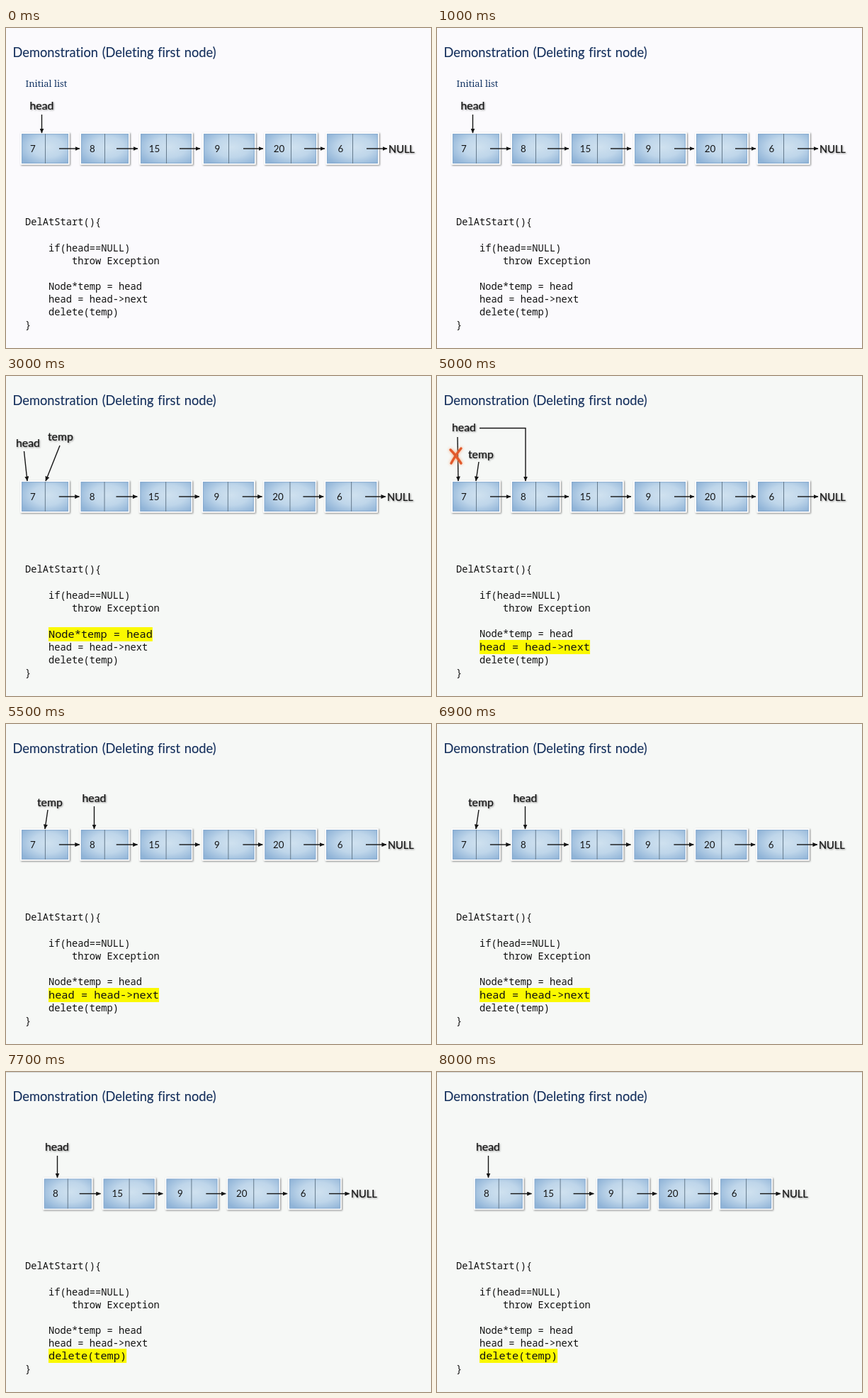
An HTML page that plays this animation: 600 px wide and 451 px high, repeating every 9.6 s.

```html
<!DOCTYPE html>
<html lang="en">
<head>
<meta charset="utf-8">
<style>
html, body { margin: 0; width: 100%; height: 100%; overflow: hidden; }
svg { display: block; width: 600px; height: 451px; }
text { font-family: Lato, "Open Sans", sans-serif; font-variant-ligatures: none; fill: #151515; }
.title { font-size: 18.3px; word-spacing: 1px; fill: #142f5c; stroke: #142f5c; stroke-width: .1; }
.sub { font: 12.9px "Noto Serif", serif; fill: #173766; }
.code { font: 13.75px "Noto Sans Mono", monospace; fill: #111; }
.big { font-size: 15.3px; }
.label { font-size: 15.8px; stroke: #151515; stroke-width: .2; filter: drop-shadow(1.5px 1.5px .8px #888); }
.null { font-size: 14.6px; }
.num { font-size: 13.4px; text-anchor: middle; }
.box { fill: url(#blue); stroke: #fff; stroke-width: 3.6; paint-order: stroke; filter: drop-shadow(1px 1.5px 1.2px #888); }
.edge { fill: none; stroke: #7fa3c8; stroke-width: 1.2; opacity: .55; }
.split { stroke: #667b8d; stroke-width: 1; }
.line { fill: none; stroke: #151515; stroke-width: 1.4; }
.cross { fill: none; stroke: #e2592b; stroke-width: 3.4; stroke-linecap: round; filter: drop-shadow(0 0 2px #f5a070); }
.ban { fill: none; stroke: #e8823f; stroke-width: 5; opacity: .78; filter: drop-shadow(0 0 2px #f2a66c); }
</style>
</head>
<body>
<svg viewBox="0 0 600 451">
  <defs>
    <radialGradient id="blue" cx=".56" cy=".45" r=".68">
      <stop offset="0" stop-color="#cfe1ef"/>
      <stop offset=".5" stop-color="#bfd6ea"/>
      <stop offset="1" stop-color="#8fb3d7"/>
    </radialGradient>
    <marker id="tip" viewBox="0 0 7 6" refX="6.5" refY="3" markerWidth="7" markerHeight="6"
      markerUnits="userSpaceOnUse" orient="auto"><path d="M0 0L7 3L0 6z" fill="#151515"/></marker>
  </defs>
  <g id="stage"></g>
</svg>
<script>
const LOOP = 9600;
const WHITE = "#fbfafd", GREY = "#f6f8f6";
const stage = document.getElementById("stage");

// value, left, divider, right, pointer start, pointer end
const NODES = [
  [7, 22, 55, 88, 75, 104], [8, 106, 139, 173, 156, 186], [15, 190, 226, 262, 245, 274],
  [9, 279, 314, 351, 335, 363], [20, 366, 402, 438, 421, 450], [6, 453, 489, 525, 509, 538]
];
const CODE = [
  [278, "DelAtStart(){"], [315, "    if(head==NULL)"], [333, "        throw Exception"],
  [369, "    Node*temp = head"], [387, "    head = head->next"], [405, "    delete(temp)"], [423, "}"]
];

const text = (x, y, cls, s) =>
  `<text x="${x}" y="${y}" class="${cls}">${String(s).replace(/>/g, "&gt;")}</text>`;
const label = (x, y, s) => text(x, y, "label", s);
const arrow = d => `<path class="line" d="${d}" marker-end="url(#tip)"/>`;

function list(first, dx, dy, k) {
  const at = x => 22 + (x - 22) * k + dx;
  const y = 149 + dy;
  return NODES.slice(first).map(([value, left, mid, right, from, to]) => {
    const x = at(left), w = right - left;
    return `<rect class="box" x="${x}" y="${y}" width="${w}" height="42"/>` +
      `<rect class="edge" x="${x + .6}" y="${y + .6}" width="${w - 1.2}" height="40.8"/>` +
      `<path class="split" d="M${at(mid) + .5} ${y}v42"/>` +
      text(x + (w > 70 ? 19.5 : 16), y + 25.5, "num", value) +
      arrow(`M${at(from)} ${y + 21}H${at(to)}`);
  }).join("") + text(at(540), y + 26.5, "label null", "NULL");
}

function code(active, dy) {
  return CODE.map(([base, s], i) => {
    const body = s.trimStart(), x = 27 + (s.length - body.length) * 8.25;
    const y = base + (i < 4 && i !== active ? dy : 0);
    if (i !== active) return text(x, y, "code", body);
    return `<rect x="${x}" y="${y - 15}" width="${body.length * 9.18}" height="20" fill="#fbf900"/>` +
      text(x, y, "code big", body);
  }).join("");
}

const tempLabel = label(44, 116, "temp") + arrow("M59 121L55 148");
const movedHead = label(107.5, 110, "head") + arrow("M124.5 116V148");

const SCENES = [
  { at: 0, bg: WHITE, k: 1, dy: 0, active: -1,
    marks: text(27.5, 83, "sub", "Initial list") + label(33.5, 115, "head") + arrow("M50.5 122V148") },
  { at: 2500, bg: GREY, k: .996, dy: -1, active: 3,
    marks: label(14, 100, "head") + arrow("M25.5 106L30 148") + label(59, 91, "temp") + arrow("M76 98L56 148") },
  { at: 5000, bg: GREY, k: 1, dy: -1, active: 4,
    marks: label(21, 78, "head") + arrow("M29 86L30 148") + arrow("M60 73.5H125V148") + tempLabel +
      `<path class="cross" d="M19 104Q26 111 34 123M34 102Q27 110 20 123"/>` },
  { at: 5500, bg: GREY, k: .998, dy: -1, active: 4, marks: tempLabel + movedHead },
  { at: 7200, bg: WHITE, k: .996, dy: -1, active: 5,
    marks: tempLabel + movedHead +
      `<ellipse class="ban" cx="56" cy="147.5" rx="32.5" ry="36"/>` +
      `<path class="ban" d="M33 122L79 173M79 122L33 173"/>` },
  { at: 7700, bg: GREY, k: .998, dy: 0, active: 5, first: 1, dx: -52, down: 1.5,
    marks: label(55, 111, "head") + arrow("M72.5 118V149") + `<rect width="600" height="1" fill="#d4d6d4"/>` }
];

let shown;
function draw(now) {
  const t = now % LOOP;
  const s = SCENES.findLast(scene => scene.at <= t);
  if (s !== shown) {
    shown = s;
    stage.innerHTML = `<rect width="600" height="451" fill="${s.bg}"/>` +
      text(9.5, 40.7, "title", "Demonstration (Deleting first node)") +
      list(s.first || 0, s.dx || 0, s.down || 0, s.k) + s.marks + code(s.active, s.dy);
  }
  requestAnimationFrame(draw);
}
draw(0);
</script>
</body>
</html>
```
